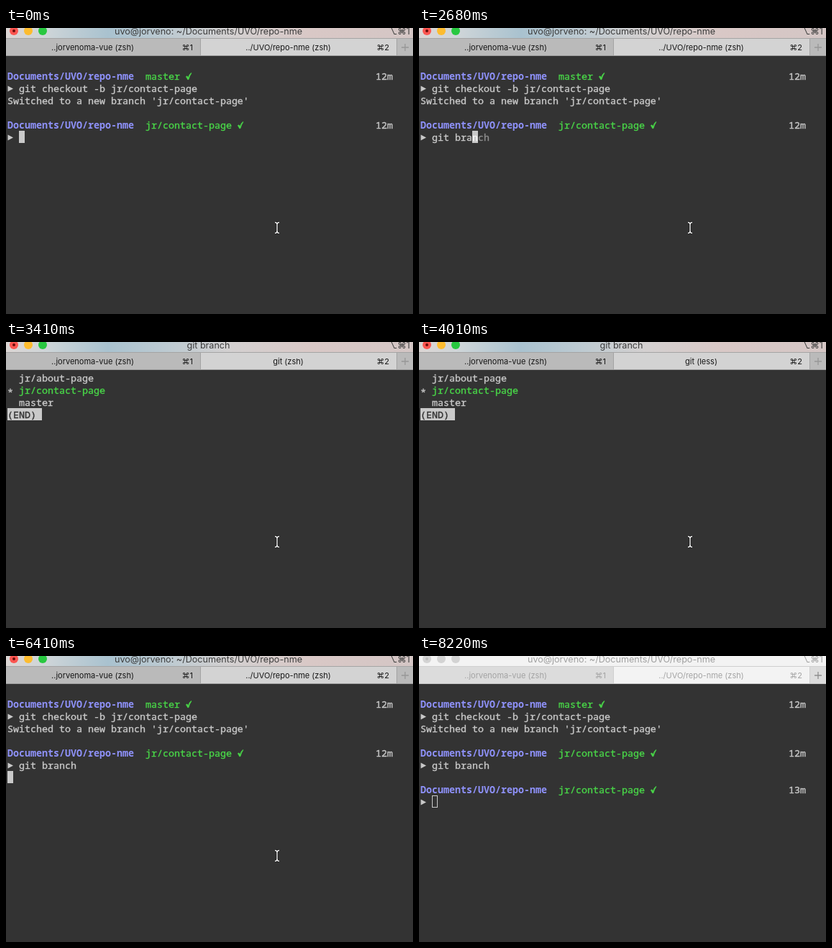
Animation, 566 px wide and 398 px high, one loop 8.32 s. Source, as an HTML page:

```html
<!DOCTYPE html>
<html lang="en">
<head>
<meta charset="utf-8">
<title>Terminal: git branch</title>
<style>
  html, body { margin: 0; width: 100%; height: 100%; overflow: hidden; background: #333; }
  svg { display: block; width: 566px; height: 398px; }
  text { white-space: pre; }
  .term { font: 500 13.333px "Noto Sans Mono", monospace; stroke-width: .35px; }
  .term .bold { font-weight: 700; stroke: none; }
  .ui { font-family: Inter, "DejaVu Sans", sans-serif; }
  .title { font-size: 12.6px; }
  .tab { font-size: 11px; }
</style>
</head>
<body>
<svg id="stage" viewBox="0 0 566 398" xmlns="http://www.w3.org/2000/svg"></svg>
<script>
const LOOP = 8320;
const CELL = 8, LINE = 17, LEFT = 2, TOP = 41;
const FG = '#c9c9c9', DIM = '#8e8e8e', BLUE = '#8f92fb', GREEN = '#49d648', BG = '#333333';
const PATH = 'Documents/UVO/repo-nme';
const BRANCH = 'jr/contact-page';
const CHECKOUT = 'git checkout -b ' + BRANCH;
const LIST = 'git branch';

// time, typed characters, line being completed
const TYPING = [
  [0, 0, ''],
  [1950, 1, CHECKOUT],
  [2090, 2, CHECKOUT],
  [2240, 4, CHECKOUT],
  [2380, 5, LIST],
  [2680, 7, LIST],
  [2820, 8, LIST],
  [2970, 10, LIST]
];
const PAGER = 3410, TAB_RENAME = 4010, QUIT = 6410, PROMPT = 6560, POINTER_OFF = 7300, BLUR = 8220;
const CUTS = [...TYPING.map(s => s[0]), PAGER, TAB_RENAME, QUIT, PROMPT, POINTER_OFF, BLUR];

const stage = document.getElementById('stage');
const colX = col => LEFT + col * CELL;
const rowY = row => TOP + row * LINE;

const rect = (x, y, w, h, fill, extra = '') =>
  `<rect x="${x}" y="${y}" width="${w}" height="${h}" fill="${fill}" ${extra}/>`;

const put = (row, col, str, fill = FG, cls = '', dy = 14) =>
  `<text class="${cls}" x="${colX(col)}" y="${rowY(row) + dy}" fill="${fill}" stroke="${fill}">${str}</text>`;

const label = (cls, x, y, str, fill, anchor = 'middle') =>
  `<text class="ui ${cls}" x="${x}" y="${y}" fill="${fill}" text-anchor="${anchor}">${str}</text>`;

const arrow = row =>
  `<path d="M2.5 ${rowY(row) + 5.5}l7.5 4-7.5 4z" fill="${FG}"/>`;

const check = (row, col) =>
  `<path transform="translate(${colX(col)} ${rowY(row) + 4})" d="M.3 5.8L2 4.800 3.300 7Q4.700 2.700 7.300.5L8 .8Q5.300 4.600 4 9.700H2.600Q1.600 7.500.3 5.800z" fill="${GREEN}" stroke="${GREEN}" stroke-width=".6"/>`;

const block = (row, col) => rect(colX(col), rowY(row), CELL, LINE, FG);

const prompt = (row, branch, clock) =>
  put(row, 0, PATH, BLUE, 'bold') +
  put(row, 24, branch, GREEN) +
  check(row, 25 + branch.length) +
  put(row, 64, clock) +
  arrow(row + 1);

function history() {
  return prompt(1, 'master', '12m') +
    put(2, 2, CHECKOUT) +
    put(3, 0, `Switched to a new branch '${BRANCH}'`) +
    prompt(5, BRANCH, '12m');
}

function commandLine(t) {
  const [, n, line] = TYPING.filter(s => s[0] <= t).pop();
  const col = 2 + n;
  return put(6, 2, line.slice(0, n)) +
    block(6, col) +
    put(6, col, line.slice(n, n + 1), '#f8f8f8') +
    put(6, col + 1, line.slice(n + 1), DIM);
}

function pager() {
  return put(0, 2, 'jr/about-page') +
    put(1, 0, '*', FG, '', 17) + put(1, 2, BRANCH, GREEN) +
    put(2, 2, 'master') +
    rect(LEFT, rowY(3), 6 * CELL, LINE, FG) +
    put(3, 0, '(END)', BG);
}

function finished(t) {
  let out = history() + put(6, 2, LIST);
  if (t < PROMPT) return out + block(7, 0);
  out += prompt(8, BRANCH, '13m');
  return out + (t < BLUR ? block(9, 2) :
    rect(18.5, rowY(9) + .5, CELL - 1, LINE - 1, 'none', `stroke="${FG}" stroke-width="1"`));
}

function lights(active) {
  const fills = active ? ['#fb5550', '#fdbc2f', '#28c840'] : Array(3).fill('#d3d3d3');
  return fills.map((f, i) =>
    `<circle cx="${11 + 20 * i}" cy="4" r="6" fill="${f}"/>`).join('') +
    `<circle cx="11" cy="4" r="2" fill="${active ? '#6b0d0b' : '#bcbcbc'}"/>`;
}

function windowBar(t) {
  const active = t < BLUR;
  const inPager = t >= PAGER && t < QUIT;
  const ink = active ? '#3d3d3d' : '#a0a0a0';
  const tabInk = active ? '#161616' : '#a3a3a3';
  const edge = active ? '#a4a4a4' : '#cfcfcf';
  const title = inPager ? LIST : `uvo@jorveno: ~/${PATH}`;
  const tab = !inPager ? '../UVO/repo-nme (zsh)' : t < TAB_RENAME ? 'git (zsh)' : 'git (less)';
  return rect(0, 0, 566, 15, active ? 'url(#tint)' : '#f3f3f3') +
    lights(active) +
    label('title', 281.5, 9, title, ink) +
    label('title', 562, 9, '⌥⌘1', ink, 'end') +
    rect(0, 15, 270, 23, active ? '#bababa' : '#dcdcdc') +
    rect(271, 15, 272, 23, active ? '#d3d3d3' : '#f3f3f3') +
    rect(544, 15, 22, 23, active ? '#bababa' : '#dcdcdc') +
    rect(0, 14, 566, 1, edge) + rect(270, 15, 1, 23, edge) + rect(543, 15, 1, 23, edge) +
    rect(0, 38, 566, 1, active ? '#9e9e9e' : '#c4c4c4') +
    label('tab', 120.5, 31, '..jorvenoma-vue (zsh)', tabInk) +
    label('tab', 260, 31, '⌘1', tabInk, 'end') +
    label('tab', 392.5, 31, tab, tabInk) +
    label('tab', 533, 31, '⌘2', tabInk, 'end') +
    `<path d="M550 27h10M555 22v10" stroke="${active ? '#979797' : '#8f8f8f'}" stroke-width="1.300"/>`;
}

function pointer() {
  const d = 'M374 270.500Q377 270.500 377 273.500V282.500Q377 285.500 374 285.500M380 270.500Q377 270.500 377 273.500M377 282.500Q377 285.500 380 285.500';
  return `<path d="${d}" fill="none" stroke="#151515" stroke-width="3"/>` +
    `<path d="${d}" fill="none" stroke="#f2f2f2" stroke-width="1.400"/>`;
}

const TINT = `<defs><linearGradient id="tint">
  <stop offset="0" stop-color="#dcd6d4"/><stop offset=".1" stop-color="#ced5d8"/>
  <stop offset=".25" stop-color="#a9c2cf"/><stop offset=".4" stop-color="#bdcad1"/>
  <stop offset=".55" stop-color="#d3d0d0"/><stop offset=".75" stop-color="#d9c8c6"/>
  <stop offset="1" stop-color="#d4c6c5"/></linearGradient></defs>`;

function draw(t) {
  const screen = t < PAGER ? history() + commandLine(t) : t < QUIT ? pager() : finished(t);
  stage.innerHTML = TINT + rect(0, 0, 566, 398, BG) + windowBar(t) +
    `<g class="term">${screen}</g>` + (t < POINTER_OFF ? pointer() : '');
}

let shown = -1;
function tick(now) {
  const t = now % LOOP;
  const step = CUTS.filter(c => c <= t).length;
  if (step !== shown) {
    shown = step;
    draw(t);
  }
  requestAnimationFrame(tick);
}
tick(performance.now());
</script>
</body>
</html>
```
